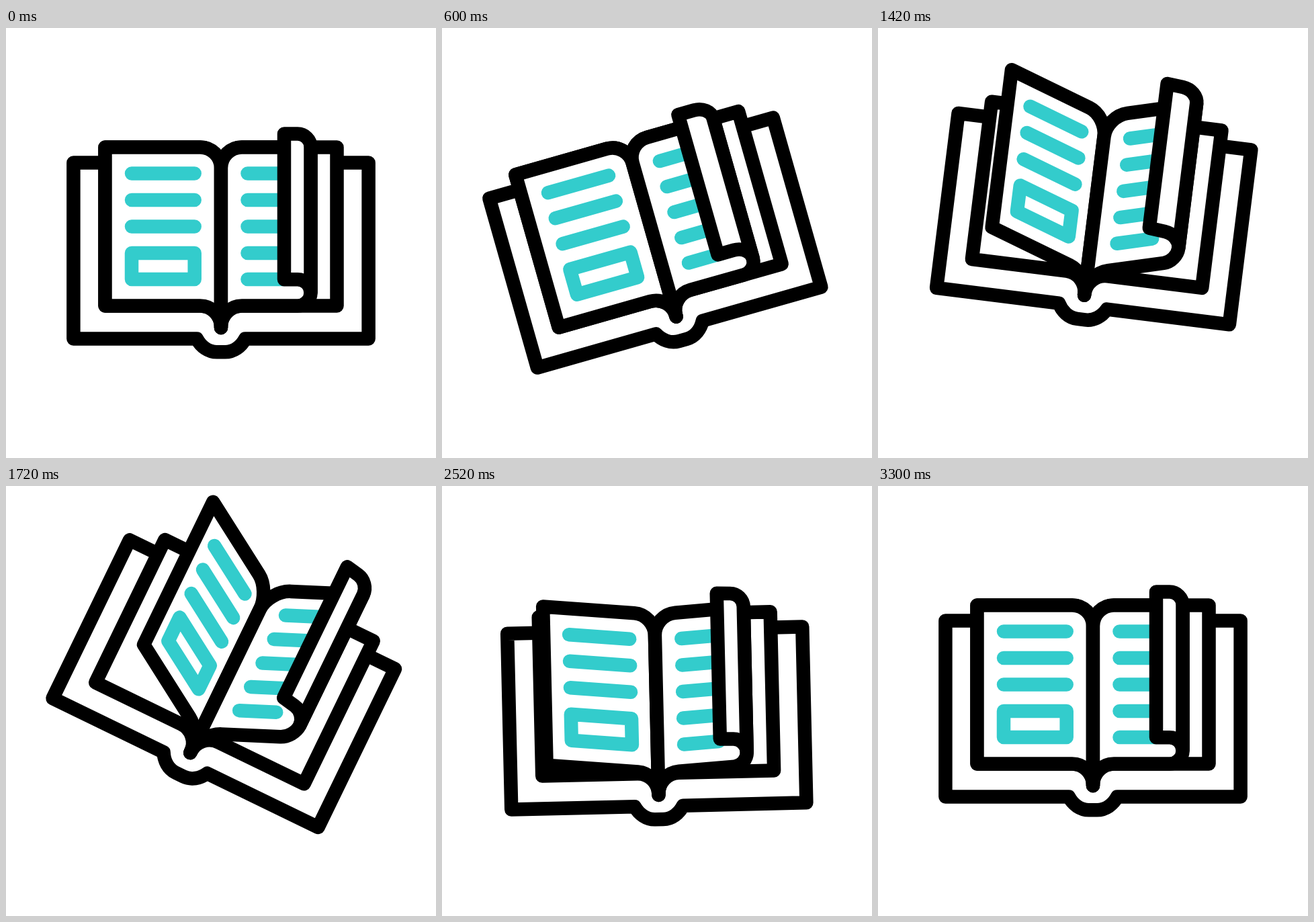
An HTML page with a canvas for the animation above (3600 ms loop, 640 px wide and 640 px high).

```html
<!DOCTYPE html>
<html lang="en">
<head>
<meta charset="utf-8">
<title>Open book</title>
<style>
  html, body { margin: 0; width: 100%; height: 100%; overflow: hidden; background: #fff; }
  canvas { display: block; width: 640px; height: 640px; }
</style>
</head>
<body>
<canvas id="stage" width="640" height="640"></canvas>
<script>
const ctx = document.getElementById('stage').getContext('2d');
const LOOP = 3600, SPINE = 320, FOLD = 453.5, FLAP = 39.5, PIVOT = 341.3;
const BLACK = '#000', TEAL = '#33cccc';
const ROWS = [216.5, 256, 295.5, 335, 374];

// Keys are [time, value]; each stretch eases in and out.
const KEYS = {
  angle: [[200, 0], [918, -27], [1764, 26.3], [2790, -7], [3300, 0]],
  dip: [[0, 0], [120, 73], [240, 0]],
  rise: [[200, 0], [1400, -47.6], [2800, 21], [3300, 0]],
  left: [[990, 0], [1760, 1], [2790, 0]],
  right: [[990, 0], [1715, 1], [2790, 0]],
  curl: [[200, 0], [990, 18], [1760, 0]]
};

const COVER = new Path2D('M100.4 200.6V462.6H284C290 474 301 482.3 314 482.3H326C339 482.3 350 474 356 462.6H539.6V200.6Z');
const UNDER = new Path2D('M147.5 177.4H289A31 31 0 0 1 320 208.4A31 31 0 0 1 351 177.4H492.5V413.6H351A31 31 0 0 0 320 444.6V446V444.6A31 31 0 0 0 289 413.6H147.5Z');
const LEFT = new Path2D('M320 208.4A31 31 0 0 0 289 177.4H147.5V413.6H289A31 31 0 0 1 320 444.6V446Z');
const RIGHT = new Path2D('M320 208.4A31 31 0 0 1 351 177.4H453.5V394A19.6 19.6 0 0 1 434 413.6H351A31 31 0 0 0 320 444.6V446Z');
const CURL = new Path2D('M414 157.6H434A19.6 19.6 0 0 1 453.5 177.2V394A19.6 19.6 0 0 0 434 374.2H414Z');
const LEFT_ROWS = new Path2D(ROWS.slice(0, 3).map(y => `M187 ${y}H280.7`).join('') + 'M187 335H280.7V374H187Z');
const RIGHT_ROWS = new Path2D(ROWS.map(y => `M359.5 ${y}H412`).join(''));

function track(keys, t) {
  let [t0, v0] = keys[0];
  if (t <= t0) return v0;
  for (const [t1, v1] of keys) {
    if (t < t1) {
      const s = (t - t0) / (t1 - t0);
      return v0 + (v1 - v0) * s * s * (3 - 2 * s);
    }
    [t0, v0] = [t1, v1];
  }
  return v0;
}

// Bends the outline only, so the pen keeps an even width.
function draw(shape, matrix, color = BLACK, filled = true) {
  const path = new Path2D();
  path.addPath(shape, matrix);
  if (filled) {
    ctx.fillStyle = '#fff';
    ctx.fill(path);
  }
  ctx.strokeStyle = color;
  ctx.stroke(path);
}

// Squeezes a page towards the spine and tilts its free edge.
function pageMatrix(scale, slope) {
  return new DOMMatrix([scale, scale * slope, 0, 1, SPINE * (1 - scale), -SPINE * scale * slope]);
}

function render(t) {
  const pose = {};
  for (const name in KEYS) pose[name] = track(KEYS[name], t);
  const rad = Math.PI / 180;
  const flat = new DOMMatrix();

  const left = pageMatrix(1 - 0.233 * pose.left, Math.tan(32 * pose.left * rad));
  const right = pageMatrix(1 - 0.035 * pose.right, -Math.tan(23.3 * pose.right * rad));
  const fold = right.transformPoint(new DOMPoint(FOLD, 0));
  const width = 1 + pose.curl / FLAP;
  const tilt = 7 * pose.right / FLAP;
  const curl = new DOMMatrix([width, tilt, 0, 1, fold.x - FOLD * width, fold.y - FOLD * tilt]);

  ctx.setTransform(1, 0, 0, 1, 0, 0);
  ctx.fillStyle = '#fff';
  ctx.fillRect(0, 0, 640, 640);
  ctx.translate(SPINE, PIVOT + pose.rise + pose.dip);
  ctx.rotate(pose.angle * rad);
  ctx.translate(-SPINE, -PIVOT);
  ctx.lineWidth = 20.5;
  ctx.lineCap = ctx.lineJoin = 'round';

  draw(COVER, flat);
  draw(UNDER, flat);
  draw(LEFT, left);
  draw(LEFT_ROWS, left, TEAL, false);
  draw(RIGHT, right);
  draw(RIGHT_ROWS, right, TEAL, false);
  draw(CURL, curl);
}

function tick() {
  render(performance.now() % LOOP);
  requestAnimationFrame(tick);
}
tick();
</script>
</body>
</html>
```
